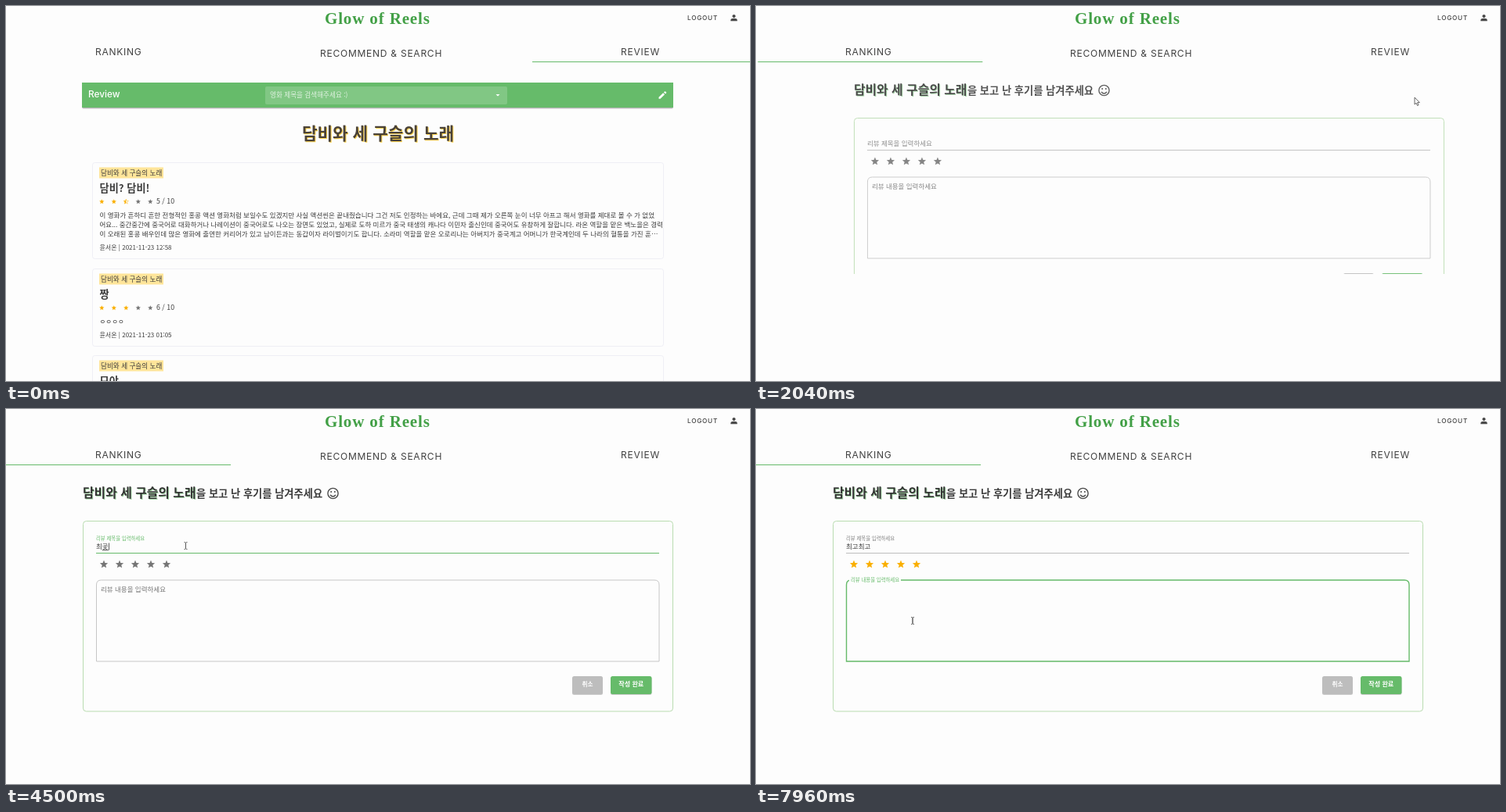
These frames come from a looping animation (950 px wide and 480 px high, 8 s). An HTML page:

```html
<!DOCTYPE html>
<html lang="ko">
<head>
<meta charset="utf-8">
<title>Glow of Reels</title>
<style>
html, body { margin: 0; width: 100%; height: 100%; overflow: hidden; background: #fdfdfd; }
svg { display: block; width: 100%; height: 100%; }
text { font-family: "Noto Sans CJK KR", "Noto Sans CJK", "Noto Sans", sans-serif; fill: #3c3c3c; white-space: pre; }
.latin { font-family: Inter, Roboto, sans-serif; fill: #404040; }
.logo { font-family: "Liberation Serif", serif; font-weight: 700; fill: #43a047; letter-spacing: .85px; }
.bold { font-weight: 700; }
.white { fill: #fff; }
.gold { fill: #4a4238; filter: drop-shadow(1.5px 1.5px 0 #ffd54f); }
.mint { fill: #333; filter: drop-shadow(1.5px 1.5px 0 #a5d6a7); }
</style>
</head>
<body>
<svg id="stage" viewBox="0 0 950 480" preserveAspectRatio="none">
  <defs>
    <clipPath id="cut"><rect width="950" height="343"/></clipPath>
  </defs>
</svg>
<script>
const LOOP = 8000;
const GREEN = '#66bb6a', AMBER = '#faaf00', GREY = '#757575', DARK = '#4a4a4a', PAPER = '#fdfdfd';
const FILM = '담비와 세 구슬의 노래';
const WRITER = '윤서온';
const stage = document.getElementById('stage');

function el(parent, tag, attrs = {}) {
  const node = document.createElementNS('http://www.w3.org/2000/svg', tag);
  set(node, attrs);
  parent.appendChild(node);
  return node;
}
function set(node, attrs) {
  for (const k in attrs) node.setAttribute(k, attrs[k]);
}
const group = (parent, attrs) => el(parent, 'g', attrs);
const rect = (parent, x, y, width, height, attrs) => el(parent, 'rect', { x, y, width, height, ...attrs });
const path = (parent, d, attrs) => el(parent, 'path', { d, ...attrs });
const show = (node, on) => node.setAttribute('visibility', on ? 'inherit' : 'hidden');

// y is the visual middle of the line
function text(parent, x, y, size, str, cls = '', attrs = {}) {
  const node = el(parent, 'text', { x, y: y + size * 0.36, 'font-size': size, class: cls, ...attrs });
  node.textContent = str;
  return node;
}

function starPath(cx, cy, r, half) {
  let d = '';
  for (let i = 0; i <= (half ? 5 : 9); i++) {
    const a = half ? -Math.PI / 2 - i * Math.PI / 5 : -Math.PI / 2 + i * Math.PI / 5;
    const q = i % 2 ? r * 0.44 : r;
    d += (i ? 'L' : 'M') + (cx + q * Math.cos(a)).toFixed(2) + ' ' + (cy + q * Math.sin(a)).toFixed(2);
  }
  return d + 'Z';
}
function stars(parent, x, y, gap, r) {
  const parts = [];
  for (let i = 0; i < 5; i++) {
    parts.push([
      path(parent, starPath(x + i * gap, y, r)),
      path(parent, starPath(x + i * gap, y, r, true), { fill: AMBER })
    ]);
  }
  return value => parts.forEach(([full, half], i) => {
    const isHalf = value - i === 0.5;
    set(full, {
      fill: isHalf ? 'none' : value > i ? AMBER : GREY,
      stroke: isHalf ? AMBER : 'none',
      'stroke-width': r * 0.14
    });
    show(half, isHalf);
  });
}

// Review list
const list = group(stage);
rect(list, 97, 100, 755, 32, { fill: '#000', opacity: 0.1, rx: 2 });
rect(list, 97, 99, 755, 32, { fill: '#000', opacity: 0.2, rx: 2 });
rect(list, 97, 98, 755, 32, { fill: GREEN });
text(list, 105, 113, 11.8, 'Review', 'latin white', { 'font-weight': 500 });
rect(list, 331, 103, 309, 23, { fill: '#81c784', rx: 2 });
text(list, 337, 114, 8.6, '영화 제목을 검색해주세요 :)', 'white', { opacity: 0.75 });
path(list, 'M625.5 113h5l-2.5 2.6z', { fill: '#fff' });
const halo = el(list, 'circle', { cx: 838, cy: 114, r: 12, fill: '#fff' });
path(list, 'M833.5 116.8v2h2l5.6-5.6-2-2zM839.9 110.4l1-1q.6-.5 1.2 0l.9.9q.5.6 0 1.2l-1 1z', { fill: '#fff' });
text(list, 475, 163, 21.3, FILM, 'bold gold', { 'text-anchor': 'middle' });

function card(y, height, title, score, lines, stamp) {
  rect(list, 110.5, y + 0.5, 729, height, { fill: 'none', stroke: '#efeff5', rx: 3 });
  rect(list, 119, y + 6.5, 82, 14, { fill: '#ffe59a' });
  text(list, 121, y + 13.5, 8.6, FILM);
  text(list, 119.5, y + 33, 13.2, title, 'bold');
  if (!lines) return;
  stars(list, 122.3, y + 50.5, 15.5, 3.3)(score / 2);
  text(list, 192, y + 50, 8.8, score + ' / 10');
  lines.forEach((line, i) => text(list, 119.5, y + 68 + i * 12.1, 8.52, line));
  text(list, 119.5, y + 73 + lines.length * 12, 8, WRITER + ' | ' + stamp);
}
card(200, 123, '담비? 담비!', 5, [
  '이 영화가 흔하디 흔한 전형적인 홍콩 액션 영화처럼 보일수도 있겠지만 사실 액션씬은 끝내줬습니다 그건 저도 인정하는 바에요, 근데 그때 제가 오른쪽 눈이 너무 아프고 해서 영화를 제대로 볼 수 가 없었',
  '어요... 중간중간에 중국어로 대화하거나 나레이션이 중국어로도 나오는 장면도 있었고, 실제로 도하 미르가 중국 태생의 캐나다 이민자 출신인데 중국어도 유창하게 잘합니다. 라온 역할을 맡은 백노을은 경력',
  '이 오래된 홍콩 배우인데 많은 영화에 출연한 커리어가 있고 남이든과는 동갑이자 라이벌이기도 합니다. 소라미 역할을 맡은 오로리나는 아버지가 중국계고 어머니가 한국계인데 두 나라의 혈통을 가진 훈…'
], '2021-11-23 12:58');
card(336, 99, '짱', 6, ['ㅇㅇㅇㅇ'], '2021-11-23 01:05');
card(447, 99, '모야');

const wait = group(stage);
rect(wait, 0, 471, 319, 9, { fill: '#b3e8ee' });
text(wait, 2, 476.5, 6.6, '127.0.0.1의 응답을 기다리는 중...');

// Review form
const clip = group(stage);
const form = group(clip);
text(form, 98, 107.5, 15.85, FILM, 'bold mint');
text(form, 243, 108, 13.25, '을 보고 난 후기를 남겨주세요', 'bold');
const face = group(form, { fill: 'none', stroke: DARK, 'stroke-width': 1.4 });
el(face, 'circle', { cx: 417.5, cy: 108, r: 6.6 });
path(face, 'M414 110q3.5 4 7 0');
for (const x of [415.2, 419.8]) el(face, 'circle', { cx: x, cy: 106, r: 1, fill: DARK, stroke: 'none' });
rect(form, 98.5, 143.5, 753, 243.5, { fill: 'none', stroke: '#b9dcb0', rx: 4 });

const rule = rect(form, 115, 184, 719, 1, { fill: '#bdbdbd' });
const ruleOn = rect(form, 115, 184, 719, 1, { fill: GREEN });
const titleLabel = text(form, 0, 0, 8.5, '리뷰 제목을 입력하세요');
const value = text(form, 115, 175.8, 8.5, '');
const compose = rect(form, 0, 180.2, 8, 0.9, { fill: DARK });
const spell = path(form, 'M115 181.3h31', { stroke: '#e25a48', 'stroke-width': 1.1, 'stroke-dasharray': '1.5 1' });
const caret = rect(form, 0, 0, 0.9, 9, { fill: DARK });
const rate = stars(form, 125, 199, 20, 5.4);

const area = path(form, 'M115.5 323V225q0-6 6-6H828q6 0 6 6v98z', { fill: 'none' });
const notch = rect(form, 119, 216, 66, 5, { fill: PAPER });
const bodyLabel = text(form, 0, 0, 8.5, '리뷰 내용을 입력하세요');

function button(x, width, color, label, size) {
  rect(form, x, 343, width, 23, { fill: '#000', opacity: 0.2, rx: 2.5 });
  rect(form, x, 342, width, 23, { fill: color, rx: 2.5 });
  text(form, x + width / 2, 352.5, size, label, 'bold white', { 'text-anchor': 'middle' });
}
button(723, 39, '#bdbdbd', '취소', 7.6);
button(772, 52.5, GREEN, '작성 완료', 8.1);

// Header
text(stage, 407, 15.8, 21, 'Glow of Reels', 'logo');
text(stage, 870, 14.8, 8.2, 'LOGOUT', 'latin', { 'letter-spacing': 0.75, 'font-weight': 500 });
el(stage, 'circle', { cx: 929.5, cy: 13, r: 2.1, fill: DARK });
path(stage, 'M925.3 19.3v-1.2q0-2.3 4.2-2.3t4.2 2.3v1.2z', { fill: DARK });
[['RANKING', 114, 59], ['RECOMMEND & SEARCH', 401, 60.8], ['REVIEW', 785, 59]]
  .forEach(([label, x, y]) => text(stage, x, y, 12, label, 'latin', { 'letter-spacing': 0.75 }));
const tab = rect(stage, 672, 71, 278, 1, { fill: GREEN });

// Pointers, each drawn around its hot spot
const line = { fill: '#fff', stroke: '#555', 'stroke-width': 0.9, 'stroke-linejoin': 'round' };
const pointer = {
  arrow: path(stage, 'M0 0v9l2-1.8 1.5 3.3 1.5-.7-1.5-3.2h2.8z', line),
  beam: path(stage, 'M-2-4.5q2 0 2 1v7q0 1 2 1M2-4.5q-2 0-2 1v7q0 1-2 1', { ...line, fill: 'none' }),
  hand: path(stage, 'M-.8 5.5V.5q.9-1.2 1.8 0V4l3.8 1q.8.3.6 1.2L4.8 10H.3L-3 6.4q.3-1.4 2.2-.9z', line)
};

// time, x, y
const TRACK = [
  [500, 949, 230], [900, 900, 165], [1400, 841, 117], [2250, 841, 117], [2900, 229.5, 175],
  [5400, 229.5, 175], [5750, 140, 200], [6150, 204, 204], [6300, 204, 204], [6450, 210, 204],
  [6750, 210, 204], [7250, 200, 271], [8000, 200, 271]
];
const TYPED = [
  [3950, 'ㅊ'], [4060, '초'], [4130, '최'], [4210, '쵝'], [4290, '최고'], [4500, '최곷'],
  [4600, '최고초'], [4680, '최고최'], [4780, '최고쵝'], [4870, '최고최고']
];
const OPEN = 1800, FOCUS = 3018, RATED = 6550, BODY = 7420;

const span = (t, start, length) => Math.max(0, Math.min(1, (t - start) / length));
const smooth = p => p * p * (3 - 2 * p);
const out = p => 1 - (1 - p) ** 3;
const mix = (a, b, p) => a + (b - a) * p;

function pointAt(t) {
  let i = 0;
  while (i < TRACK.length - 2 && t >= TRACK[i + 1][0]) i++;
  const [t0, x0, y0] = TRACK[i], [t1, x1, y1] = TRACK[i + 1];
  const p = smooth(span(t, t0, t1 - t0));
  return [mix(x0, x1, p), mix(y0, y1, p)];
}
function place(node, x, y0, y1, p, color) {
  node.setAttribute('transform', `translate(${x} ${mix(y0, y1, p)}) scale(${mix(1, 0.75, p)})`);
  node.style.fill = color;
}

function draw(t) {
  const [x, y] = pointAt(t);
  const opened = t >= OPEN;
  show(list, !opened);
  show(form, opened);
  show(wait, t >= 1640 && !opened);

  const hover = Math.hypot(x - 838, y - 114) < 14;
  set(halo, { opacity: hover ? 0.2 + 0.22 * smooth(span(t, 1560, 150)) : 0 });

  const slide = smooth(span(t, 1760, 290));
  set(tab, { x: mix(672, 0, slide), width: mix(278, 287, slide) });
  const enter = span(t, OPEN, 450);
  set(form, { transform: `translate(${265 * (1 - enter) ** 3} 0)`, opacity: Math.min(1, enter * 1.65) });
  if (t < 2090) set(clip, { 'clip-path': 'url(#cut)' });
  else clip.removeAttribute('clip-path');

  const inTitle = t >= FOCUS && t < RATED;
  const inBody = t >= BODY;
  place(titleLabel, 115, 175.5, 166, out(span(t, FOCUS, 200)), inTitle ? GREEN : '#808080');
  const grow = inTitle ? out(span(t, FOCUS, 200)) : 0;
  set(ruleOn, { x: 474.5 - 359.5 * grow, width: 719 * grow });

  const done = TYPED.filter(k => t >= k[0]);
  const [keyTime, str] = done.length ? done[done.length - 1] : [FOCUS, ''];
  if (value.textContent !== str) value.textContent = str;
  const end = 115 + str.length * 7.85;
  show(compose, opened && inTitle && str);
  set(compose, { x: end - 7.9 });
  show(spell, inTitle && t >= 5000);

  const since = inBody ? t - BODY : t - keyTime;
  show(caret, (inTitle || inBody) && Math.floor(since / 530) % 2 === 0);
  set(caret, inBody ? { x: 121.5, y: 227 } : { x: end + 0.3, y: 171.5 });

  const onStars = opened && y > 189 && y < 210 && x > 115 && x < 215;
  rate(t >= RATED ? 5 : onStars ? Math.ceil((x - 115) / 10) / 2 : 0);

  const lift = out(span(t, BODY, 200));
  place(bodyLabel, 121, 231, 218.7, lift, inBody ? GREEN : '#777');
  show(notch, inBody);
  set(notch, { width: 66 * lift });
  set(area, { stroke: inBody ? GREEN : '#c6c6c6', 'stroke-width': inBody ? 1.4 : 1 });

  const overText = opened && x > 115 && x < 834 && ((y > 164 && y < 187) || (y > 219 && y < 323));
  const kind = onStars ? 'hand' : overText ? 'beam' : 'arrow';
  for (const k in pointer) {
    show(pointer[k], k === kind && t >= TRACK[0][0]);
    set(pointer[k], { transform: `translate(${x} ${y})` });
  }
}

let start;
function tick(now) {
  if (start === undefined) start = now;
  draw((now - start) % LOOP);
  requestAnimationFrame(tick);
}
draw(0);
requestAnimationFrame(tick);
</script>
</body>
</html>
```
